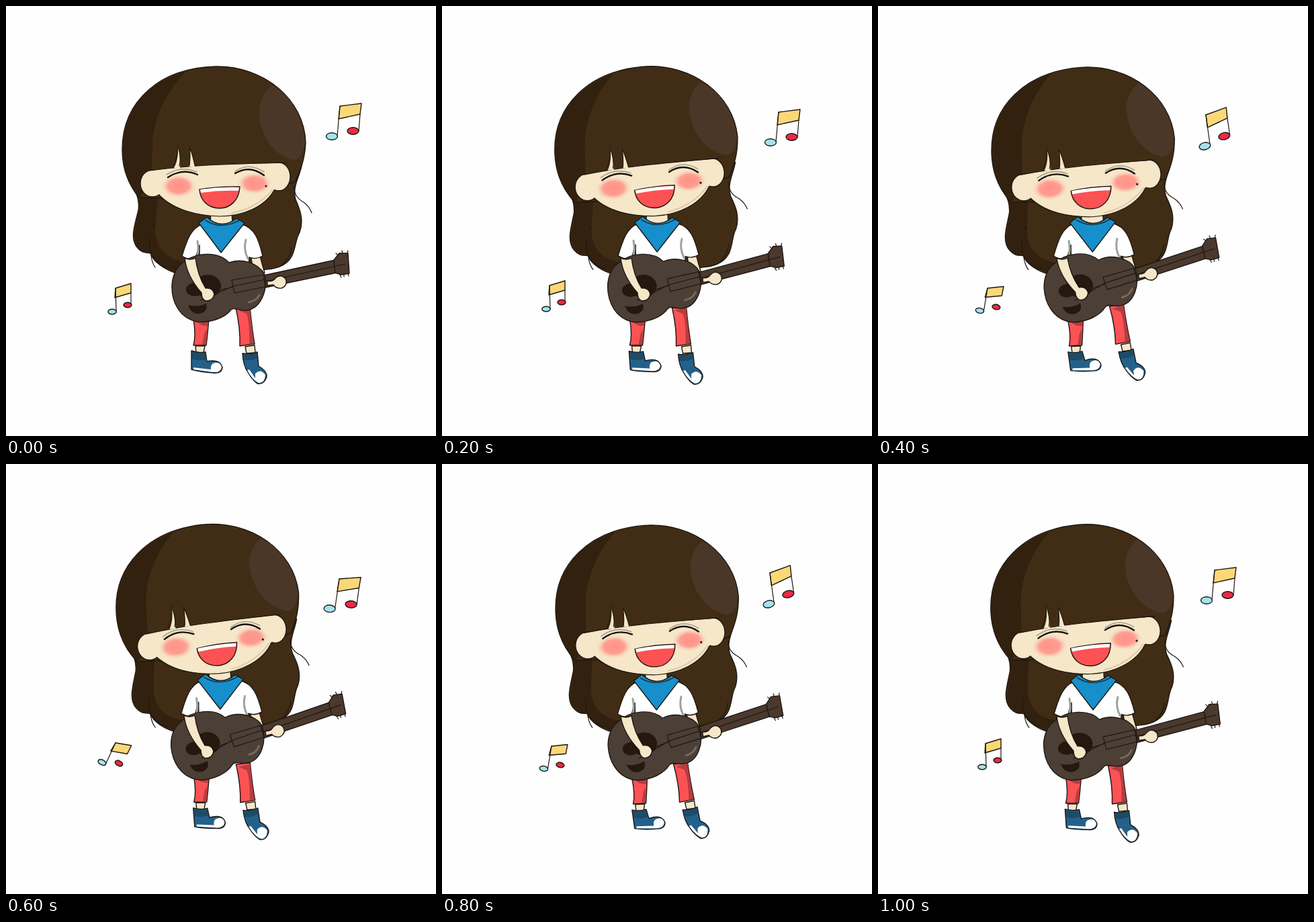
Recreate the animation shown at these times as an HTML page. Size 640x640 px, loop 1200 ms.

```html
<!DOCTYPE html>
<html lang="en">
<head>
<meta charset="utf-8">
<title>Girl with guitar</title>
<style>
html, body { margin: 0; width: 100%; height: 100%; overflow: hidden; background: #fefefe; }
svg { display: block; width: 100vw; height: 100vh; }
path, ellipse, circle { stroke-linejoin: round; stroke-linecap: round; }
.ink { stroke: #1d1712; stroke-width: 1.4; }
.line { fill: none; stroke: #1d1712; stroke-width: 1.2; }
.skin { fill: #f6e7c9; }
.hair { fill: #412d15; }
.dark { fill: #33210f; }
.white { fill: #fff; }
.red { fill: #fc5254; }
.maroon { fill: #b53d40; }
.blue { fill: #23618b; }
.navy { fill: #1d4b69; }
.wood { fill: #4c3f36; }
.hole { fill: #24180f; }
</style>
</head>
<body>
<svg viewBox="0 0 640 640">
  <defs>
    <radialGradient id="blush">
      <stop offset="0" stop-color="#ff9388"/>
      <stop offset=".55" stop-color="#ff9c90"/>
      <stop offset=".65" stop-color="#fbb3a4"/>
      <stop offset="1" stop-color="#f6dfc4" stop-opacity="0"/>
    </radialGradient>
  </defs>

  <g id="locks">
    <path class="hair ink" d="M180 240C188 272 200 282 197 304C192 325 184 345 195 359C202 368 208 367 215 368C219 380 235 393 258 399L300 400L388 392C404 391 419 386 426 371C432 357 431 347 437 337C444 318 437 302 431 288C426 270 436 256 440 238Z"/>
    <path class="dark" d="M198 286C199 322 184 342 196 359Q205 368 215 367C220 380 238 392 258 397L262 380Q224 372 222 335L226 285Z"/>
    <path class="line" d="M214 345Q212 362 218 372Q224 384 240 389M216 371Q217 382 222 389M410 386Q423 376 425 360M429 268C428 280 435 288 443 292Q452 299 455 308"/>
    <circle class="hole" cx="220" cy="327" r="1.5"/>
  </g>

  <g id="legs">
    <path class="red ink" d="M279 466L302 465Q300 490 298 505L279 505Q283 490 279 466Z"/>
    <path class="maroon" d="M284 469L301 468L300 476Q289 477 284 469ZM295 488L299 480L297 504L292 504Z"/>
    <path class="red ink" d="M342 449L363 447Q366 480 370 503L348 506Q349 480 342 449Z"/>
    <path class="maroon" d="M346 453L363 449Q366 482 369 502L362 504Q363 472 358 458Z"/>
    <path class="skin ink" d="M282 506L296 506L294 516L283 516ZM356 507L370 505L371 516L358 517Z"/>
    <g id="shoeL">
      <path class="blue ink" d="M276 513Q287 517 297 515L299 529Q319 525 322 538Q321 548 308 546Q290 545 276 541Z"/>
      <path class="navy" d="M277 514Q287 518 296 516L298 526Q286 529 277 525Z"/>
      <path class="white" d="M308 532Q319 528 321 538Q319 546 308 545L279 541L279 538L305 541Q304 535 308 532Z"/>
    </g>
    <g id="shoeR">
      <path class="blue ink" d="M352 517Q364 519 374 515L376 536Q389 543 388 552Q384 564 374 562Q366 556 360 545Q353 535 352 517Z"/>
      <path class="navy" d="M353 518Q364 520 373 516L374 524Q364 529 354 527Z"/>
      <path class="white" d="M371 547Q379 539 386 549Q385 562 376 561Q367 557 359 542L362 541L371 554Z"/>
    </g>
  </g>

  <g id="body">
    <path class="skin ink" d="M364 370L377 368Q381 384 385 397L369 399Z"/>
    <path class="white ink" d="M291 325C276 331 270 346 262 372Q272 379 282 375L288 356L288 402L360 402L362 374Q372 378 382 372C376 347 370 330 351 325Z"/>
    <path d="M357 348Q353 362 360 376M285 350Q287 362 285 371" fill="none" stroke="#9aa49c" stroke-width="3"/>
    <path class="skin ink" d="M305 308L336 308L337 321Q320 330 304 321Z"/>
    <path d="M287 323L299 314Q320 334 343 316L355 323L320 367Z" fill="#168fcb" class="ink"/>
    <path class="line" d="M297 319Q320 334 347 319"/>
  </g>

  <g id="head">
    <path class="hair ink" d="M198 285C184 268 173 246 173 214C173 140 231 92 312 90C385 89 444 140 446 203C445 226 440 241 430 262L320 290Z"/>
    <path class="dark" d="M199 285C184 268 174 246 174 214C174 154 212 113 268 97C236 130 218 170 218 210L216 262Z"/>
    <path d="M397 118C425 134 444 169 445 204Q440 231 426 229C395 221 374 185 377 150Q382 128 397 118Z" fill="#4b3728"/>
    <ellipse class="skin ink" cx="218" cy="264" rx="18" ry="20"/>
    <ellipse class="skin ink" cx="406" cy="254" rx="17" ry="21"/>
    <path class="skin" d="M215 245Q260 239 300 237T406 234L405 262C391 300 350 313 318 313C282 312 246 301 226 278Z"/>
    <path class="line" d="M228 282C248 303 284 312 318 313C350 313 385 300 399 274M214 245Q260 239 300 237T416 233"/>
    <path d="M336 308Q374 301 396 274" fill="none" stroke="#dccbae" stroke-width="2"/>
    <path class="skin" d="M250 241Q257 228 256 209Q260 225 259 241ZM273 239Q275 222 273 209Q278 222 281 239Z"/>
    <path class="line" d="M248 239Q255 228 256 208M258 238Q261 226 257 212M273 237Q275 221 273 209M281 237Q278 222 274 212"/>
    <ellipse cx="257" cy="268" rx="27" ry="18" fill="url(#blush)"/>
    <ellipse cx="370" cy="264" rx="26" ry="17" fill="url(#blush)"/>
    <path d="M239 251Q261 237 284 247M341 246Q362 232 384 247" fill="none" stroke="#a79f90" stroke-width="1.6"/>
    <path d="M241 255Q262 241 285 251M341 249Q363 236 384 252" fill="none" stroke="#191410" stroke-width="2.4"/>
    <circle class="hole" cx="387" cy="268" r="1.6"/>
    <path class="red ink" d="M288 273Q318 268 348 269C347 290 333 301 318 301C300 301 289 289 288 273Z"/>
    <path class="white" d="M289 273Q318 269 347 270L346 275Q318 274 290 278Z"/>
  </g>

  <g id="guitar">
    <path class="ink" fill="#4b392e" d="M383 401L490 378L492 397L386 419Z"/>
    <path class="ink" fill="#4b392e" d="M488 378L496 368L509 368L511 398L499 400L490 397Z"/>
    <path class="line" d="M494 371L491 368M501 368L500 364M508 368L509 364M497 400L499 404M503 399L503 403M509 398L510 402M386 410L505 384"/>
    <path class="wood ink" d="M266 380C285 365 318 366 332 382C350 375 376 382 385 400C390 425 378 453 355 453C345 453 340 448 335 452C325 465 305 471 285 470C258 465 246 440 247 415C248 400 255 386 266 380Z"/>
    <ellipse class="hole" cx="300" cy="417" rx="20" ry="17"/>
    <ellipse class="hole" cx="281" cy="422" rx="13" ry="10"/>
    <path class="hole" d="M271 445Q284 449 298 443Q301 456 287 458Q275 458 271 445Z"/>
    <path class="line" d="M336 408L383 400L386 418L340 427ZM290 438L338 417L386 407M318 423L338 418"/>
    <path d="M361 441Q373 439 377 430" fill="none" stroke="#74695f" stroke-width="3"/>
    <path class="skin ink" d="M389 409Q397 411 401 405Q409 398 416 406Q420 416 410 420Q402 421 398 415L389 416Z"/>
  </g>

  <path id="arm" class="skin ink" d="M266 375Q274 379 282 375C284 392 289 407 297 420Q308 419 310 429Q308 439 298 439Q291 437 291 427C278 412 268 396 266 375Z"/>

  <g id="big" class="ink">
    <path fill="#fbd877" d="M0 0L32 -4L30 12L-2 19Z"/>
    <path class="line" d="M0 0L-4 44M30 12L28 37"/>
    <ellipse cx="-12" cy="45" rx="8.5" ry="5.3" fill="#a2e3ee"/>
    <ellipse cx="19.5" cy="37" rx="8.5" ry="5.2" fill="#ea2a45"/>
  </g>

  <g id="small" class="ink">
    <path fill="#fbd877" d="M0 0L23 -7L23 7L-1 14Z"/>
    <path class="line" d="M0 0L1 35"/>
    <path id="stem" class="line" d="M23 7L23 24"/>
    <ellipse cx="-5" cy="35" rx="6.2" ry="3.8" fill="#a2e3ee"/>
    <ellipse cx="18" cy="25" rx="6" ry="3.8" fill="#ea2a45"/>
  </g>
</svg>
<script>
const $ = id => document.getElementById(id);

// part: pivot, then [dx, dy, angle] for each of the four poses
const parts = {
  locks:  { pivot: [305, 345], poses: [[0, 0, 0], [1, 0, -2.3], [0, 0, -2.3], [-2, -1, -2.8]] },
  legs:   { pivot: [320, 400], poses: [[0, 0, 0], [.5, 0, 0], [0, -1, -3], [0, -2, -.4]] },
  shoeL:  { pivot: [285, 515], poses: [[0, 0, 0], [2, 0, -4], [1, 0, -5], [2, 0, -4]] },
  shoeR:  { pivot: [363, 515], poses: [[0, 0, 0], [-1, 1, -1], [0, 0, -3], [0, 0, -3]] },
  body:   { pivot: [320, 350], poses: [[0, 0, 0], [0, -1, -.5], [-1, -1, -1], [-1.5, -2, -1]] },
  head:   { pivot: [318, 284], poses: [[0, 0, 0], [-.8, -.5, -3.6], [-.3, .8, -3], [-3, -1, -5]] },
  guitar: { pivot: [300, 425], poses: [[0, 0, 0], [0, 0, -3], [1, -.5, -6.3], [-.5, -1, -6.9]] },
  arm:    { pivot: [274, 376], poses: [[0, 0, 0], [0, 0, 0], [0, 0, -3], [-1, -1, 0]] },
  big:    { pivot: [0, 0], poses: [[497, 149, 0], [501, 158, 0], [488, 162, -13], [496, 171, 3]] },
  small:  { pivot: [0, 0], poses: [[163, 420, 0], [160, 416, 0], [163, 420, 11], [163, 415, 26.5]] }
};
const order = [0, 1, 2, 3, 2, 1];
const hold = 200;

function draw(now) {
  const pose = order[Math.floor(now / hold) % order.length];
  for (const [id, { pivot, poses }] of Object.entries(parts)) {
    const [x, y, angle] = poses[pose];
    $(id).setAttribute('transform', `translate(${x} ${y}) rotate(${angle} ${pivot})`);
  }
  $('stem').setAttribute('visibility', pose < 2 ? 'visible' : 'hidden');
}

const start = performance.now();
function tick() {
  draw(performance.now() - start);
  requestAnimationFrame(tick);
}
tick();
</script>
</body>
</html>
```
